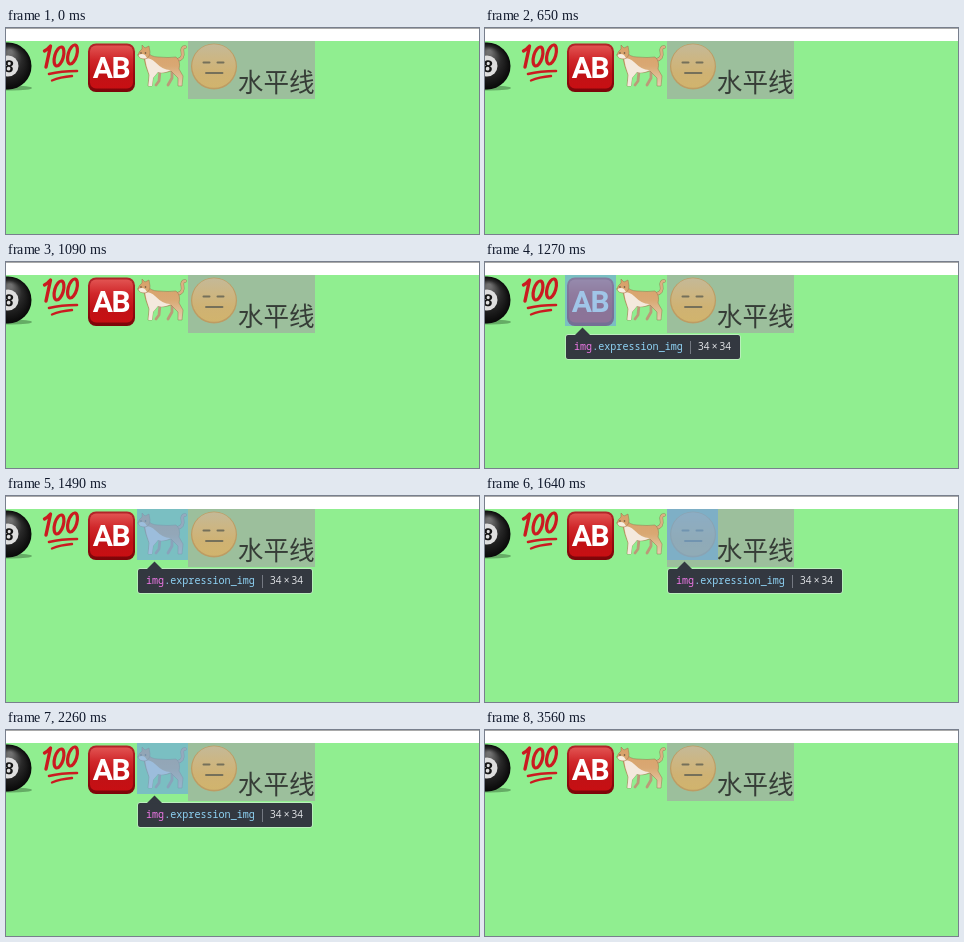
These frames come from a looping animation (473 px wide and 206 px high, 4.28 s). An HTML page with a canvas:

```html
<!DOCTYPE html>
<html lang="zh">
<head>
<meta charset="utf-8">
<style>
html, body { margin: 0; width: 100%; height: 100%; overflow: hidden; background: #90ee90; }
canvas { display: block; }
</style>
</head>
<body>
<canvas id="stage" width="473" height="206"></canvas>
<script>
const ctx = document.getElementById('stage').getContext('2d');
const LOOP = 4280;
// start time and left edge of the inspected image
const steps = [[0, null], [1270, 80], [1490, 131], [1640, 182], [2260, 131], [3560, null]];

function fill(path, color) {
  ctx.fillStyle = color;
  ctx.fill(new Path2D(path));
}

function stroke(path, color, width) {
  ctx.strokeStyle = color;
  ctx.lineWidth = width;
  ctx.lineCap = ctx.lineJoin = 'round';
  ctx.stroke(new Path2D(path));
}

function disc(x, y, r, color) {
  ctx.fillStyle = color;
  ctx.beginPath();
  ctx.arc(x, y, r, 0, Math.PI * 2);
  ctx.fill();
}

function box(x, y, w, h, r, color) {
  ctx.fillStyle = color;
  ctx.beginPath();
  ctx.roundRect(x, y, w, h, r);
  ctx.fill();
}

function label(text, x, y, font, color, align = 'left') {
  ctx.font = font;
  ctx.fillStyle = color;
  ctx.textAlign = align;
  ctx.fillText(text, x, y);
}

function blend(y0, y1, ...colors) {
  const g = ctx.createLinearGradient(0, y0, 0, y1);
  colors.forEach((c, i) => g.addColorStop(i / (colors.length - 1), c));
  return g;
}

function ball() {
  // soft shadow on the ground
  ctx.fillStyle = 'rgba(20,50,20,.35)';
  ctx.beginPath();
  ctx.ellipse(6, 60, 20, 2.5, 0, 0, Math.PI * 2);
  ctx.fill();
  const g = ctx.createRadialGradient(4, 24, 2, 2, 38, 23.5);
  g.addColorStop(0, '#707070');
  g.addColorStop(0.5, '#2a2a2a');
  g.addColorStop(1, '#080808');
  disc(2, 38, 23.5, g);
  disc(2, 38, 10.5, '#dedede');
  ctx.save();
  ctx.translate(3, 38);
  ctx.rotate(0.12);
  label('8', 0, 6, 'bold 17px "Liberation Sans", sans-serif', '#151515', 'center');
  ctx.restore();
}

function hundred() {
  const red = '#cb1a20';
  stroke('M38.5 23 Q42 21 44.5 18 L40 39', red, 3.4);
  ctx.strokeStyle = red;
  ctx.lineWidth = 3.2;
  for (const [x, y] of [[53, 28.5], [66.5, 26.5]]) {
    ctx.beginPath();
    ctx.ellipse(x, y, 4.3, 9.8, 0.28, 0, Math.PI * 2);
    ctx.stroke();
  }
  stroke('M43 46 Q55 43 71 43', red, 2.6);
  stroke('M46 52.5 Q54 49 66 48', red, 2.4);
}

function bloodType() {
  box(82, 15.5, 47, 48.5, 8, blend(15, 64, '#b3262a', '#9c0d12', '#7c0509'));
  box(84, 17.5, 43, 43, 6, blend(17, 61, '#e25553', '#d0272a', '#c01216', '#c80f13'));
  ctx.letterSpacing = '-1.5px';
  label('AB', 105, 50, 'bold 30px Roboto, sans-serif', '#fff', 'center');
  ctx.letterSpacing = '0px';
}

function cat() {
  const fur = blend(18, 58, '#d8a169', '#d9a873', '#e6cfb0');
  const edge = 'rgba(145,105,72,.75)';
  const tail = 'M171 32 Q178 31 176.5 24 Q175.5 19 179 19';
  stroke(tail, edge, 3.6);
  stroke(tail, '#dcb083', 2.6);
  stroke('M154 43 L153 53 L150 57 M166 42 L166 50 L162 57', '#bb9a78', 2.8);
  const body = 'M141 24 Q145 29 152 29 Q163 30 170 29 Q175 33 173 41 L177 48 L176 58 L172 58 L172 50 L165 43 Q157 46 152 44 L147 50 L146 58 L142 58 L143 47 Q139 37 138 30 Z';
  fill(body, fur);
  stroke(body, edge, 0.6);
  fill('M139 30 Q145 30 149 34 Q158 43 165 42 Q157 46 152 44 L147 50 L146 58 L142.5 58 L143.5 47 Q140 38 139 30 Z', '#f4e9dd');
  const head = 'M132 27 Q133 23 136 21 L136 17 L139 20 L143 18 L144 24 Q144 30 139 31 Q133 31 132 27 Z';
  fill(head, fur);
  stroke(head, edge, 0.6);
  fill('M132.5 27 Q136 25 139 27 L141 30 Q134 32 132.5 27 Z', '#f6ece0');
  disc(135, 25, 0.8, '#5a4a39');
  disc(139.5, 25, 0.8, '#5a4a39');
}

function face() {
  box(182, 13, 127, 58, 0, '#9cbf9c');
  disc(208, 38.5, 23, '#bd9c63');
  disc(208, 38, 21.8, blend(16, 60, '#c4b998', '#ccb684', '#cfb273', '#d1b46d'));
  stroke('M197.5 34.5 H203.5 M211.5 34.5 H217.5', '#75705a', 2);
  stroke('M200 45 H216.5', '#75705a', 1.9);
  label('水平线', 231.8, 64, '300 25.6px "Noto Sans CJK SC", "Noto Sans CJK", sans-serif', '#363d37');
}

function inspect(x) {
  box(x, 13, 51, 51, 0, 'rgba(111,168,220,.66)');
  const left = x + 1, tip = x + 17.5;
  box(left - 0.7, 72.3, 175.4, 25.4, 3, 'rgba(220,240,225,.75)');
  box(left, 73, 174, 24, 2, '#333840');
  fill(`M${tip - 8} 73.5 L${tip} 65.5 L${tip + 8} 73.5 Z`, '#333840');
  const mono = '10.08px "Noto Sans Mono", monospace';
  label('img', x + 9, 88, mono, '#ee78e6');
  label('.expression_img', x + 9 + ctx.measureText('img').width, 88, mono, '#8fd3f5');
  box(x + 125, 79, 1, 13, 0, '#747982');
  const sans = '10px "Open Sans", sans-serif';
  label('34', x + 133, 88, sans, '#e8eaed');
  label('×', x + 149.5, 88, sans, '#e8eaed', 'center');
  label('34', x + 154.5, 88, sans, '#e8eaed');
}

function draw(now) {
  const t = now % LOOP;
  const target = steps.filter(s => s[0] <= t).pop()[1];
  box(0, 0, 473, 206, 0, '#90ee90');
  box(0, 0, 473, 13, 0, '#fff');
  box(0, 0, 473, 1, 0, '#a9a9a9');
  ball();
  hundred();
  bloodType();
  cat();
  face();
  if (target !== null) inspect(target);
}

const start = performance.now();
function tick() {
  draw(performance.now() - start);
  requestAnimationFrame(tick);
}
tick();
</script>
</body>
</html>
```
